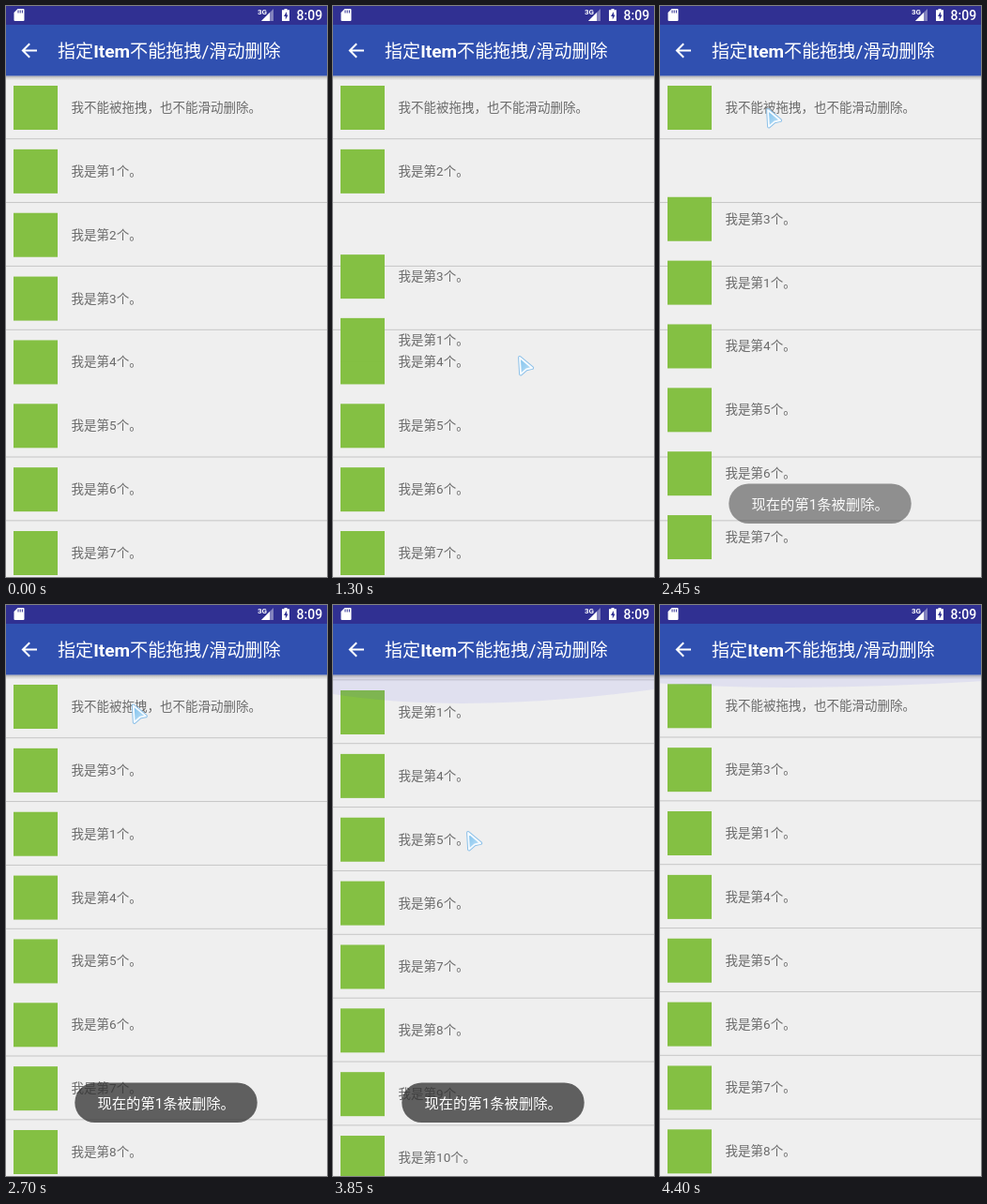
These frames come from a looping animation (342 px wide and 609 px high, 4.65 s). An HTML page:

```html
<!DOCTYPE html>
<html lang="zh">
<head>
<meta charset="utf-8">
<title>列表拖拽与滑动删除</title>
<style>
html, body { margin: 0; width: 100%; height: 100%; overflow: hidden; background: #efefef; }
svg { display: block; width: 342px; height: 609px; }
text { font-family: Roboto, "Noto Sans CJK SC", "Noto Sans CJK", sans-serif; }
.row { font-size: 13.5px; fill: #6a6a6a; }
.title { font-size: 19.1px; fill: #fff; }
.title tspan { font-weight: 600; }
</style>
</head>
<body>
<svg viewBox="0 0 342 609" xmlns="http://www.w3.org/2000/svg">
  <defs>
    <linearGradient id="shade" x2="0" y2="1">
      <stop offset="0" stop-color="#000" stop-opacity=".28"/>
      <stop offset=".5" stop-color="#000" stop-opacity=".1"/>
      <stop offset="1" stop-color="#000" stop-opacity="0"/>
    </linearGradient>
    <linearGradient id="ice" x2="1" y2="1">
      <stop offset="0" stop-color="#7cc0ec"/>
      <stop offset="1" stop-color="#c6e4f8"/>
    </linearGradient>
    <path id="arrow" d="M2 2 15.2 13 9 14.3 3 19.6Z" stroke-linejoin="round"/>
  </defs>
  <rect width="342" height="609" fill="#efefef"/>
  <rect id="press" y="75" width="342" height="66" fill="#dfdfdf"/>
  <g id="lines" fill="#c6c6c6"></g>
  <g id="rows"></g>
  <path id="glow" d="M0 0V21Q140 43 342 16V0Z" fill="rgb(50,50,240)" fill-opacity=".08"/>

  <rect y="74.5" width="342" height="5" fill="url(#shade)"/>
  <rect width="342" height="21" fill="#303092"/>
  <rect y="20" width="342" height="54.5" fill="#3050b0"/>
  <path d="M33 47.5H18.5M25.2 40.2 17.9 47.5 25.2 54.8" fill="none" stroke="#fff" stroke-width="2"/>
  <text class="title" x="55" y="55">指定<tspan>Item</tspan>不能拖拽/滑动删除</text>

  <g fill="#fff">
    <path d="M12.5 3H18.5Q19.5 3 19.5 4V15Q19.5 16 18.5 16H9.5Q8.5 16 8.5 15V7Z"/>
    <path d="M13 4.5V7.5M15.2 4.5V7.5M17.4 4.5V7.5" stroke="#303092"/>
    <path d="M285 3V16H272Z" opacity=".4"/>
    <path d="M281 7V16H272Z"/>
    <text x="268" y="9" font-size="8" font-weight="700">3G</text>
    <path d="M296.5 3H299.5V4.3H302V16H294V4.3H296.5Z"/>
    <path d="M299 6 296 11H297.8V14.5L300.6 9.6H299Z" fill="#303092"/>
    <text x="309.5" y="14.5" font-size="14" font-weight="500">8:09</text>
  </g>

  <g id="toast">
    <rect x="73.3" y="509.5" width="194.4" height="42.5" rx="21.2" fill="#323232" fill-opacity=".76"/>
    <text x="97.5" y="536.6" font-size="15.3" fill="#fff">现在的第1条被删除。</text>
  </g>
  <g id="cursor">
    <use href="#arrow" fill="none" stroke="#8cc0e8" stroke-width="3.8"/>
    <use href="#arrow" fill="url(#ice)" stroke="#f6fbff" stroke-width="1.8"/>
  </g>
</svg>
<script>
const LOOP = 4650, STEP = 50, PITCH = 67.86, FIRST = 108;
const GRAB = 193, PULL = 370.7, GLOW = 1.34;

// Pointer moves: start, end, target x, target y, sideways bow
const moves = [
  [50, 150, 198, GRAB],
  [750, 1300, 197, 373, 38],
  [1300, 1850, 204, 178, 104],
  [1850, 1950, 99, 178],
  [1950, 2100, 70, 178],
  [2200, 2450, 113, 109],
  [2450, 2800, 142, 104],
  [3400, 3450, 145, 112],
  [3450, 3650, 143, PULL],
  [3650, 3850, 142, 241],
  [3850, 4200, 145, 370],
  [4200, 4400, 345, 370]
];

const $ = id => document.getElementById(id);
const ramp = (t, from, to) => Math.min(1, Math.max(0, (t - from) / (to - from)));
const ease = (t, from, to) => (1 - Math.cos(Math.PI * ramp(t, from, to))) / 2;
const place = (el, x, y) => el.setAttribute("transform", `translate(${x} ${y})`);
const show = (el, on) => el.setAttribute("visibility", on ? "visible" : "hidden");

function make(parent, tag, attrs, text) {
  const el = document.createElementNS("http://www.w3.org/2000/svg", tag);
  for (const k in attrs) el.setAttribute(k, attrs[k]);
  if (text) el.textContent = text;
  return parent.appendChild(el);
}

function pointer(t) {
  let x = 300, y = 243;
  for (const [from, to, tx, ty, bow = 0] of moves) {
    const p = ramp(t, from, to);
    x += (tx - x) * p + bow * Math.sin(Math.PI * p);
    y += (ty - y) * p;
    if (p < 1) break;
  }
  return [x, y];
}

const rows = Array.from({ length: 13 }, (_, n) => {
  const g = make($("rows"), "g");
  make(g, "rect", { x: 8, y: -23, width: 47, height: 47, fill: "#84c043" });
  make(g, "text", { class: "row", x: 69.6, y: 5 }, n ? `我是第${n}个。` : "我不能被拖拽，也不能滑动删除。");
  return g;
});
$("rows").append(rows[1]); // the dragged row stays on top
const lines = rows.map(() => make($("lines"), "rect", { width: 342, height: 1 }));

// Place of row n in the list, in row heights
function slot(n, t, y) {
  const lift = ease(t, 2350, 2650);
  if (n === 0) return 0;
  if (n === 1) {
    if (t < 750) return 1;
    const drag = 1 + (Math.min(t, 1300) < 1300 ? y - GRAB : 180) / PITCH;
    return drag + (3 - drag) * ease(t, 1300, 1600) - lift;
  }
  if (n === 2) return 2 - ease(t, 1000, 1250);
  if (n === 3) return 3 - ease(t, 1200, 1450) - lift;
  return n - lift;
}

function draw(t) {
  const [x, y] = pointer(t);
  const scroll = t > 3650 ? PULL - y : 0;
  rows.forEach((g, n) =>
    place(g, n === 2 ? -342 * ramp(t, 1850, 1950) : 0, FIRST + slot(n, t, y) * PITCH - scroll));

  // Hairlines falling between two pixel rows drop out
  lines.forEach((el, k) => {
    const phase = (k * .8 - scroll + 200) % 1;
    el.setAttribute("y", 141.2 + k * PITCH - scroll);
    show(el, Math.abs(phase - .2) > .06);
  });

  const glow = GLOW * ramp(t, 3450, 3650) * Math.exp(-Math.max(0, Math.min(t, 4400) - 3650) / 690);
  $("glow").setAttribute("transform", `translate(0 74) scale(1 ${glow})`);
  $("toast").setAttribute("opacity", ramp(t, 2350, 2500) - ramp(t, 4150, 4350));
  show($("press"), t >= 3450 && t < 3550);
  show($("cursor"), t >= 50 && t < 4400);
  place($("cursor"), x, y);
}

const start = performance.now();
function tick() {
  const t = (performance.now() - start) % LOOP;
  draw(Math.floor(t / STEP) * STEP);
  requestAnimationFrame(tick);
}
draw(0);
requestAnimationFrame(tick);
</script>
</body>
</html>
```
